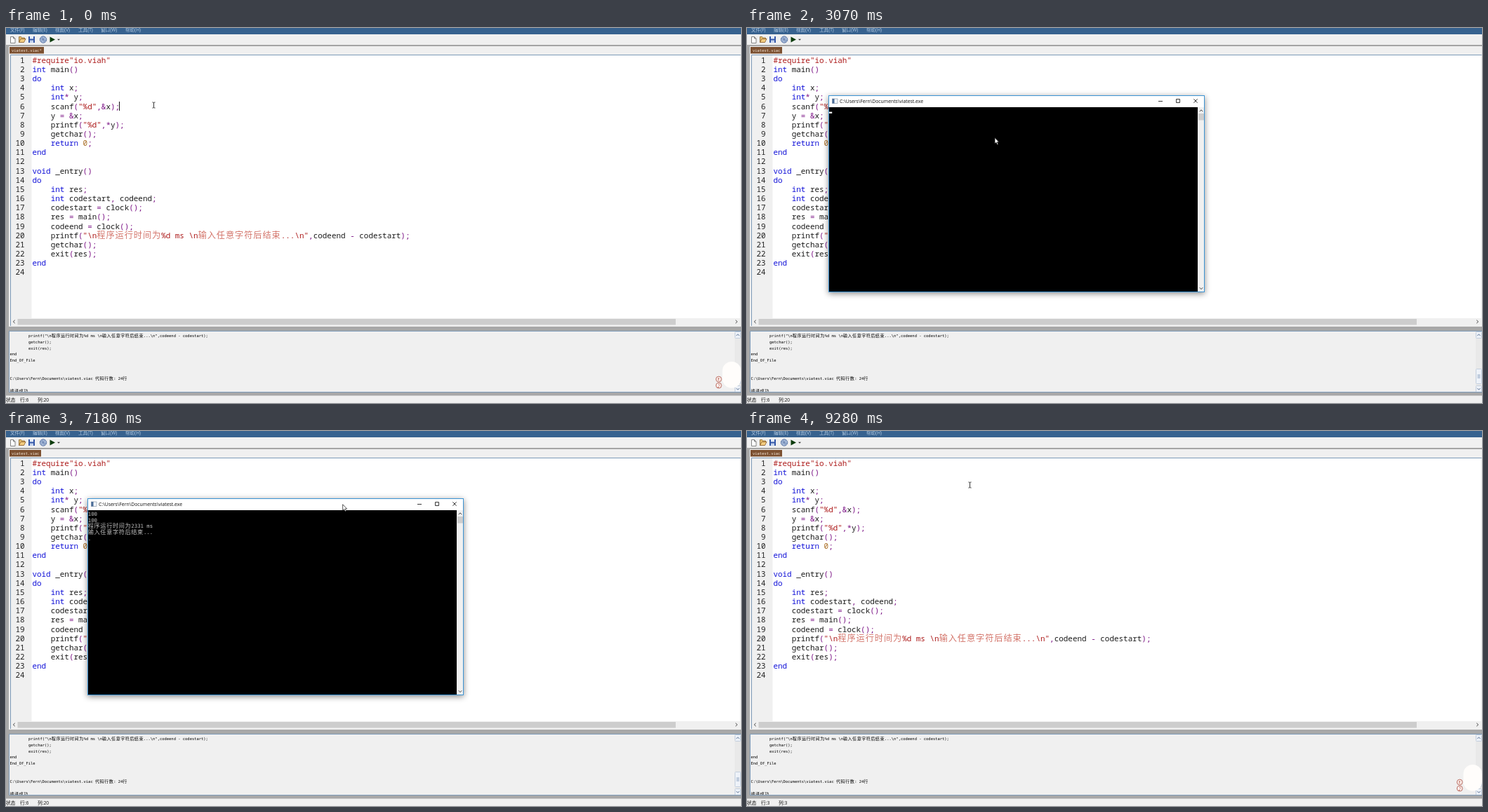
An HTML page for the animation above (9330 ms loop, 1047 px wide and 535 px high).

```html
<!DOCTYPE html>
<html lang="zh">
<head>
<meta charset="utf-8">
<style>
html, body { margin: 0; width: 100%; height: 100%; overflow: hidden; background: #f0f0f0; }
svg { display: block; }
text { white-space: pre; font-family: "Open Sans", "Noto Sans CJK SC", "Noto Sans CJK", sans-serif; }
.code { font-family: "Noto Sans Mono", "Noto Sans CJK SC", "Noto Sans CJK", monospace; }
.small { font-family: "DejaVu Sans Mono", "Noto Sans CJK SC", "Noto Sans CJK", monospace; }
.cjk { font-family: "Noto Sans CJK SC", "Noto Sans CJK", sans-serif; font-weight: 300; }
.code .cjk { fill: #d4766c; }
</style>
</head>
<body>
<svg id="stage" width="1047" height="535" viewBox="0 0 1047 535"></svg>
<script>
const LOOP = 9330, ADV = 6.565, PITCH = 13.16;
const stage = document.getElementById('stage');

const program = `#require"io.viah"
int main()
do
    int x;
    int* y;
    scanf("%d",&x);
    y = &x;
    printf("%d",*y);
    getchar();
    return 0;
end

void _entry()
do
    int res;
    int codestart, codeend;
    codestart = clock();
    res = main();
    codeend = clock();
    printf("\\n程序运行时间为%d ms \\n输入任意字符后结束...\\n",codeend - codestart);
    getchar();
    exit(res);
end
`.split('\n');

const esc = s => s.replace(/&/g, '&amp;').replace(/</g, '&lt;');
const rect = (x, y, w, h, fill, more = '') =>
  `<rect x="${x}" y="${y}" width="${w}" height="${h}" fill="${fill}" ${more}/>`;
const path = (d, stroke, fill = 'none', more = '') =>
  `<path d="${d}" stroke="${stroke}" fill="${fill}" ${more}/>`;
const group = (id, body) => `<g id="${id}">${body}</g>`;
const sans = (x, y, s, size, fill) =>
  `<text x="${x}" y="${y}" font-size="${size}" fill="${fill}">${esc(s)}</text>`;

// Chinese glyphs are drawn a little small but take exactly two Latin cells.
const wide = (s, adv) => s.replace(/[\u4e00-\u9fff]+/g, m =>
  `<tspan class="cjk" font-size="${adv * 1.86}" letter-spacing="${adv * 0.14}">${m}</tspan>`);
const mono = (x, y, html, adv, fill, cls = 'small', more = '') =>
  `<text class="${cls}" x="${x}" y="${y}" font-size="${adv / 0.6}" fill="${fill}" ${more}>${wide(html, adv)}</text>`;

function highlight(line) {
  const token = /(#require"[^"]*"|"[^"]*")|\b(int|do|end|return|void)\b|\b(\d+)\b|([()*,;=&-]+)/g;
  return line.replace(token, (m, str, key, num) => {
    const fill = str ? '#ad1c1c' : key ? '#1414d8' : num ? '#a86a20' : '#7c1486';
    return `<tspan fill="${fill}">${esc(m)}</tspan>`;
  });
}

// Chevron centred on x, y, turned by deg (0 points up).
const chevron = (x, y, deg, color = '#444') =>
  path('M-2.2 1.2L0 -1.2L2.2 1.2', color, 'none', `transform="translate(${x} ${y}) rotate(${deg})"`);

function toolbar() {
  const menus = { 6: '文件(F)', 38: '编辑(E)', 70: '视图(V)', 103: '工具(T)', 135: '窗口(W)', 170: '帮助(H)' };
  return rect(0, 0, 1047, 9, '#37628f')
    + Object.entries(menus).map(([x, s]) => sans(x, 5.2, s, 6.6, '#b4cbe2')).join('')
    + rect(0, 9, 1047, 15, '#f0f0f0')
    + path('M6.5 12.5h4l2.5 2.5v6.5h-6.5zM10.5 12.5v2.5h2.5', '#666', '#fff', 'stroke-width=".8"')
    + path('M18.5 20.5v-8h3l1 1.5h4v2', '#8a6428', '#e8c070', 'stroke-width=".8"')
    + path('M18.5 20.5l2.5-5h7l-2.5 5z', '#8a5a28', '#f2cc80', 'stroke-width=".8"')
    + rect(32, 12, 9, 9, '#3558a8') + rect(34, 12, 5, 3.5, '#e4ecfa') + rect(34, 17.5, 5, 3.5, '#c4d2ec')
    + '<circle cx="53" cy="16.5" r="4.7" fill="#a9bddb" stroke="#6079a8"/>'
    + path('M48.5 15l9 3M51 12.5l4 8M50 19.5l5-6', '#6079a8', 'none', 'stroke-width=".7"')
    + path('M62.5 12.5l7.5 4l-7.5 4z', 'none', '#0c3c0c')
    + path('M73 15.8h4l-2 2z', 'none', '#333');
}

function editor() {
  const rows = program.map((s, i) => {
    const y = 49.7 + PITCH * i;
    return mono(26.6, y, String(i + 1), ADV, '#222', 'code', 'text-anchor="end"')
      + mono(37.4, y, highlight(s), ADV, '#1c1c1c', 'code');
  });
  return rect(0, 24, 1047, 2, '#a4a4a4') + rect(0, 24, 4, 500, '#a8a8a8')
    + rect(4, 37, 1043, 389, '#f0f0f0')
    + rect(36.5, 39, 1009, 375, '#fff')
    + path('M6.5 425V38.5H1046.5', '#7d9ab8')
    + rect(7, 414, 1039, 10, '#f0f0f0') + rect(16.5, 415, 937.5, 8.5, '#cdcdcd')
    + chevron(11.5, 419, -90) + chevron(1040.5, 419, 90)
    + rows.join('');
}

function output() {
  const lines = [
    [32, 0, 'printf("\\n程序运行时间为%d ms \\n输入任意字符后结束...\\n",codeend - codestart);'],
    [32, 1, 'getchar();'], [32, 2, 'exit(res);'], [5.5, 3, 'end'], [5.5, 4, 'End_Of_File'],
    [5.5, 7, 'C:\\Users\\Fern\\Documents\\viatest.viac 代码行数: 24行'], [5.5, 9, '编译成功']
  ];
  const button = (y, h) => rect(1038.5, y, 8, h, '#eef2f8', 'stroke="#c3cedd" rx="1"');
  return rect(0, 426, 1047, 7, '#a8a8a8')
    + rect(4, 433, 1043, 87, '#f0f0f0')
    + path('M4.5 520V432.5H1047', '#7d9ab8')
    + lines.map(([x, n, s]) => mono(x, 441 + 8.77 * n, s, 3.28, '#000')).join('')
    + rect(1038, 433, 9, 87, '#e9e9e9')
    + button(433.5, 9) + chevron(1042.5, 438, 0, '#5c7396')
    + button(486.5, 21) + path('M1040.5 495h4M1040.5 497h4M1040.5 499h4', '#7890b4', 'none', 'stroke-width=".8"')
    + button(510.5, 9) + chevron(1042.5, 515, 180, '#5c7396')
    + rect(0, 519, 1047, 6, '#a8a8a8') + path('M4 519.5H1047', '#7d9ab8')
    + rect(0, 524.5, 1047, 11, '#f0f0f0')
    + sans(0, 533, '状态', 6.7, '#111')
    + '<g id="status"></g>';
}

function badge(y, s) {
  return `<circle cx="1015.3" cy="${y}" r="3.9" fill="#fff6f2" stroke="#a8483c" stroke-width=".8"/>`
    + `<text x="1015.3" y="${y + 2}" font-size="5.5" text-anchor="middle" fill="#a02c20">${s}</text>`;
}

function terminal() {
  return rect(116.5, 96.5, 535, 280, '#fff', 'stroke="#3c94d4" style="filter:drop-shadow(0 2px 4px #0007)"')
    + rect(117, 113, 525, 263, '#000')
    + rect(121.5, 101, 7.5, 6.5, '#f4f8fc', 'stroke="#8a98a8" stroke-width=".7"')
    + rect(121.5, 101, 3, 6.5, '#4a6c98')
    + sans(132, 107, 'C:\\Users\\Fern\\Documents\\viatest.exe', 6.85, '#111')
    + path('M586 104.5h6M611.5 101.5h5v5h-5zM636.3 101.3l5.4 5.4M641.7 101.3l-5.4 5.4', '#222', 'none', 'stroke-width=".9"')
    + rect(642, 113, 9, 263, '#f0f0f0') + rect(643, 122, 8, 9.5, '#cdcdcd')
    + chevron(647, 118, 0) + chevron(647, 371.5, 180)
    + '<g id="print"></g>' + rect(0, 0, 4.4, 2.2, '#fff', 'id="block"');
}

stage.innerHTML = rect(0, 0, 1047, 535, '#f0f0f0') + toolbar() + editor()
  + '<g id="tab"></g>' + output()
  + rect(0, 0, 1, 13, '#111', 'id="caret"')
  + group('ime', rect(1020.5, 476, 26.5, 37.5, '#fffdfb', 'rx="13"') + badge(501, 'E') + badge(510, '♪'))
  + group('term', terminal())
  + group('beam', path('M-2 -4h1.5l.5 .5l.5-.5h1.5M0 -3.5v7M-2 4h1.5l.5-.5l.5 .5h1.5', '#222', 'none', 'stroke-width=".9"'))
  + group('arrow', path('M0 0V8.6L2 6.8L3.5 10L4.9 9.4L3.4 6.3H6z', '#111', '#fff', 'stroke-width=".7"'));

const el = id => document.getElementById(id);
const show = (id, on) => el(id).setAttribute('visibility', on ? 'visible' : 'hidden');
const place = (id, x, y) => el(id).setAttribute('transform', `translate(${x} ${y})`);
const cache = {};
function fill(id, html) {
  if (cache[id] !== html) el(id).innerHTML = cache[id] = html;
}

// [time, x, y] of the mouse pointer
const route = [
  [30, 210.5, 110], [670, 351, 155], [870, 351, 155], [1180, 353, 156.5],
  [3840, 353, 156.5], [3841, 352, 156], [4070, 352, 156], [4170, 351.5, 156],
  [6690, 351.5, 156], [7050, 450, 118], [7400, 544, 76], [7610, 515, 73],
  [8120, 315.5, 77], [8900, 315.5, 77], [8990, 317.5, 77]
];
function pointer(t) {
  const i = route.findIndex(p => p[0] > t);
  if (i === 0) return route[0].slice(1);
  if (i < 0) return route[route.length - 1].slice(1);
  const [t0, x0, y0] = route[i - 1], [t1, x1, y1] = route[i];
  const u = (t - t0) / (t1 - t0), k = u * u * (3 - 2 * u);
  return [x0 + (x1 - x0) * k, y0 + (y1 - y0) * k];
}

// Starts on; every listed time flips it.
const blink = (t, flips) => flips.filter(f => f <= t).length % 2 === 0;

const OPEN = 3070, CLICK = 8300, ENTER = 5370;

function draw(t) {
  const open = t >= OPEN && t < CLICK, clicked = t >= CLICK, saved = t >= 1800;

  fill('tab', rect(5, 27, saved ? 45 : 49, 9.5, '#7c5030')
    + mono(8, 34.2, 'viatest.viac' + (saved ? '' : '*'), 3.28, '#f2e6d8'));
  fill('status', sans(20, 533, clicked ? '行:3' : '行:6', 6.7, '#111')
    + sans(45, 533, clicked ? '列:3' : '列:20', 6.7, '#111'));

  place('caret', clicked ? 50 : 161, clicked ? 65.5 : 105);
  show('caret', !open && (clicked ? t < 8830 : blink(t, [110, 640, 1170, 1710, 2230, 2950])));
  show('ime', !open);
  show('term', open);

  const typed = [4830, 5010, 5080].filter(k => k <= t).length;
  const done = t >= ENTER;
  const lines = ['100'.slice(0, typed)];
  if (done) lines.push('100', '程序运行时间为2331 ms', '输入任意字符后结束...', '.');
  fill('print', lines.map((s, i) => mono(116.8, 120.8 + 8.77 * i, s, 4.4, '#c0c0c0')).join(''));
  place('block', done ? 121.3 : 116.8 + 4.4 * typed, done ? 154.4 : 119.6);
  show('block', open && blink(t, [3560, 4070, 4600, 4830, 5140, ENTER, 5650, 6160, 6690, 7210, 7740]));

  const [x, y] = pointer(t);
  const isArrow = t >= 2950 && t < CLICK && y > 92;
  place('beam', x, y);
  place('arrow', x, y);
  show('beam', !isArrow);
  show('arrow', isArrow);
}

function frame() {
  draw(performance.now() % LOOP);
  requestAnimationFrame(frame);
}
frame();
</script>
</body>
</html>
```
